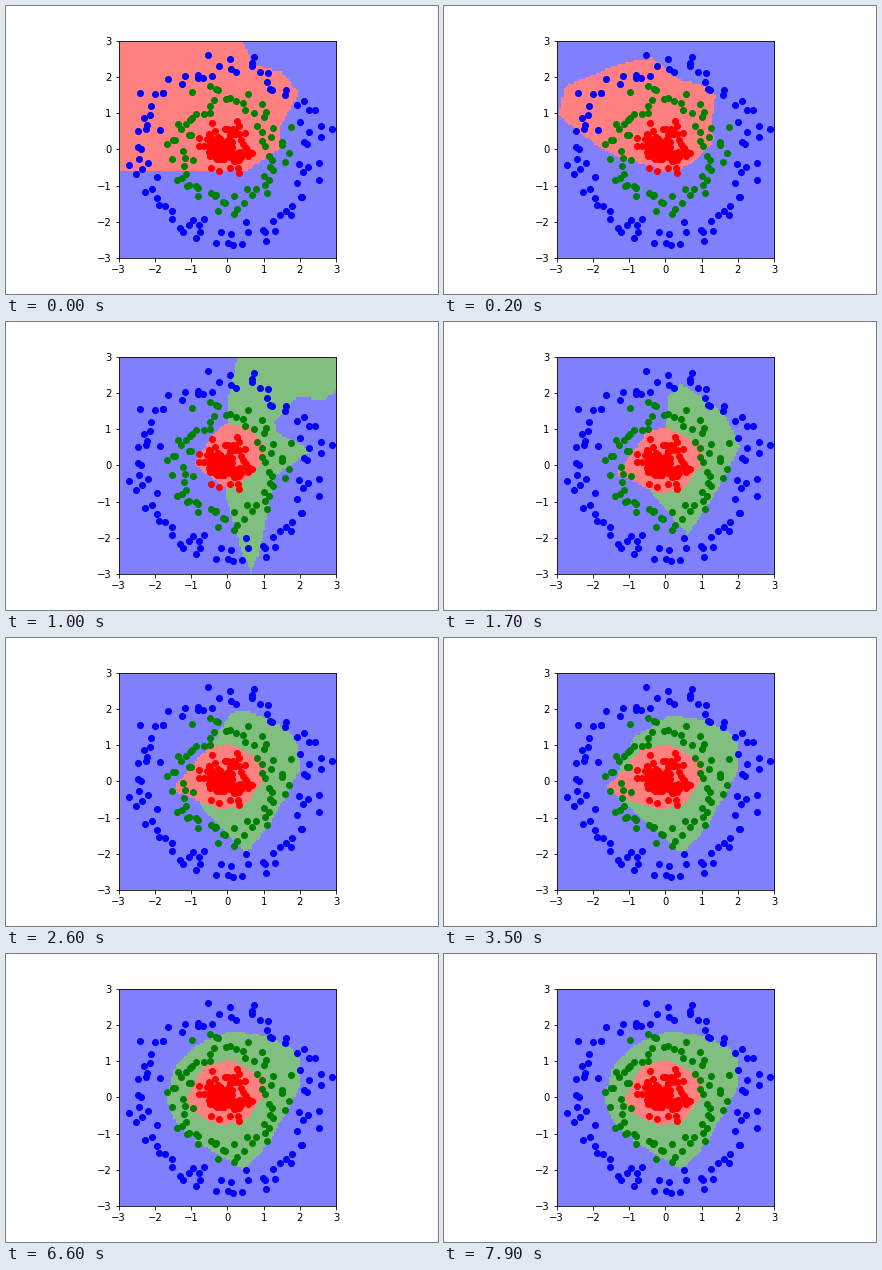
Write a matplotlib script that moves like this. It is 432x288 px and loops after 8000 ms.

```python
import matplotlib.pyplot as plt
import numpy as np
from matplotlib.animation import FuncAnimation

FRAMES, STEP, CELLS = 80, 100, 100
TINTS = np.array([[128, 128, 255], [128, 191, 128], [255, 128, 128]], np.uint8)
rng = np.random.default_rng(4)


def to_data(px):
    """Stage pixels to axes units."""
    return (np.array(px, float) - (221.4, 143.3)) / (36.24, -36.24)


def ring(count, radius, spread, low, high, extra):
    """Evenly spread, jittered ring plus a few stray points."""
    a = (np.arange(count) + rng.uniform(-0.8, 0.8, count)) * 2 * np.pi / count
    r = rng.normal(radius, spread, count).clip(low, high)
    return np.vstack((np.column_stack((r * np.cos(a), r * np.sin(a))), to_data(extra)))


outer = ring(72, 2.33, 0.17, 2.02, 2.65, [
    (123, 159), (130, 168), (326, 123), (315, 131), (260, 235), (267, 215),
    (240, 216), (222, 237), (193, 219), (190, 232), (177, 226), (166, 213),
    (154, 124), (138, 112), (134, 87), (202, 49), (246, 60), (262, 67),
    (303, 104), (313, 174)])
middle = ring(64, 1.32, 0.18, 0.98, 1.7, [
    (204, 80), (186, 86), (161, 138), (285, 121), (279, 156), (228, 208),
    (212, 205), (172, 118), (171, 174), (276, 139)])
core = rng.normal((0.02, 0.08), (0.33, 0.27), (100, 2)).clip((-0.77, -0.65), (0.76, 0.83))

# Region outlines; the settled ones share their right-hand side
red_start = [(60, 165), (240, 165), (275, 142), (273, 122), (292, 88), (275, 66),
             (247, 60), (229, 20), (60, 20)]
red_early = [(191, 140), (216, 101), (247, 102), (260, 130), (244, 154), (222, 166)]
red_side = [(222, 107), (256, 122), (260, 138), (239, 167), (215, 172)]
red_mid = red_side + [(192, 161), (172, 152), (205, 108)]
red_tip = red_side + [(166, 156), (163, 149), (195, 114)]
red_end = red_side + [(184, 157), (180, 144), (197, 113)]

green_early = [(222, 0), (360, 0), (360, 80), (315, 92), (292, 82), (262, 99),
               (266, 115), (312, 129), (265, 152), (255, 270), (235, 270), (222, 175)]
green_mid = [(223, 75), (237, 62), (280, 92), (295, 125), (275, 165), (243, 213),
             (205, 169), (222, 120)]
green_side = [(225, 77), (262, 83), (286, 95), (294, 108), (293, 134), (262, 189),
              (238, 216)]
green_tip = green_side + [(185, 170), (166, 152), (190, 100)]
green_wide = green_side + [(205, 193), (165, 155), (174, 115), (190, 92)]
green_end = green_side + [(205, 197), (171, 172), (160, 145), (169, 113), (190, 91)]

axis = (np.arange(CELLS) + 0.5) * 6 / CELLS - 3
gx, gy = np.meshgrid(axis, axis)


def signed_distance(px):
    """Distance to the outline on the grid, positive inside."""
    pts = to_data(px)
    near = np.full(gx.shape, np.inf)
    inside = np.zeros(gx.shape, bool)
    for (x0, y0), (x1, y1) in zip(pts, np.roll(pts, -1, axis=0)):
        dx, dy = x1 - x0, y1 - y0
        t = np.clip(((gx - x0) * dx + (gy - y0) * dy) / (dx * dx + dy * dy), 0, 1)
        near = np.minimum(near, np.hypot(gx - x0 - t * dx, gy - y0 - t * dy))
        if dy:
            inside ^= ((y0 > gy) != (y1 > gy)) & (gx < x0 + (gy - y0) * dx / dy)
    return np.where(inside, near, -near)


# (time in ms, red field, green field, easing power towards the next key)
keys = [
    (0, signed_distance(red_start), np.full(gx.shape, -1.0), 1),
    (500, signed_distance(red_early), signed_distance(green_early), 1.6),
    (1700, signed_distance(red_mid), signed_distance(green_mid), 0.8),
    (3500, signed_distance(red_tip), signed_distance(green_tip), 1),
    (4800, signed_distance(red_tip), signed_distance(green_wide), 1),
    (6600, signed_distance(red_end), signed_distance(green_end), 1),
]


def regions(ms):
    ms = min(ms, keys[-1][0])
    for (t0, r0, g0, power), (t1, r1, g1, _) in zip(keys, keys[1:]):
        if ms <= t1:
            break
    k = ((ms - t0) / (t1 - t0)) ** power
    red = r0 + (r1 - r0) * k > 0
    green = g0 + (g1 - g0) * k > 0
    return TINTS[np.where(red, 2, np.where(green, 1, 0))]


fig, ax = plt.subplots(figsize=(6, 4), dpi=72, facecolor="white")
fig.subplots_adjust(left=0.125, right=0.9, bottom=0.125, top=0.88)
field = ax.imshow(regions(0), origin="lower", extent=(-3, 3, -3, 3),
                  interpolation="nearest")
for pts, color in ((outer, "blue"), (middle, "green"), (core, "red")):
    ax.plot(pts[:, 0], pts[:, 1], "o", color=color, markersize=6)
ax.set(xlim=(-3, 3), ylim=(-3, 3), xticks=range(-3, 4), yticks=range(-3, 4))


def update(i):
    field.set_data(regions(i * STEP))
    return (field,)


anim = FuncAnimation(fig, update, frames=FRAMES, interval=STEP, repeat=True,
                     repeat_delay=0, blit=False)
plt.show()
```
